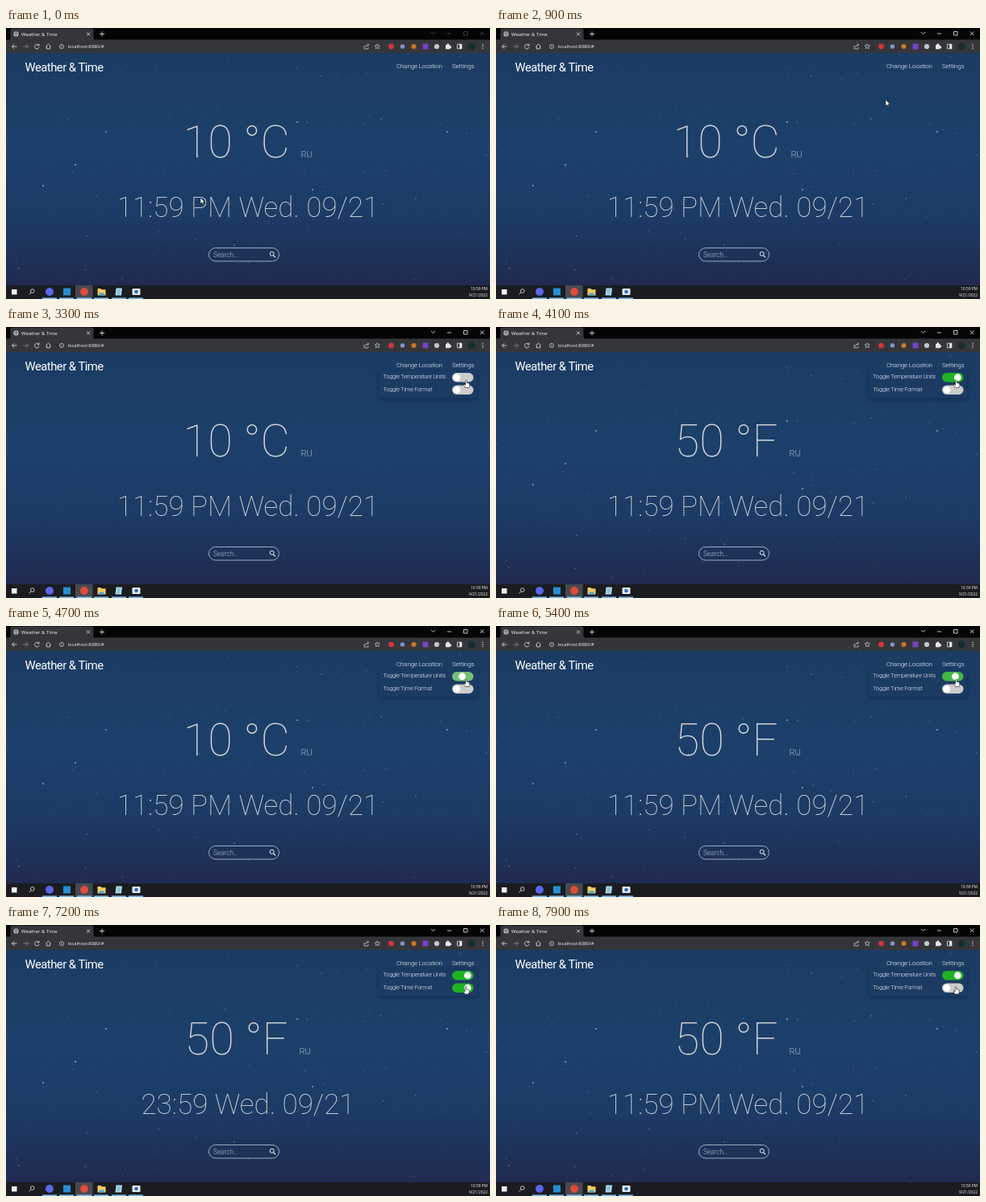
Recreate the animation shown at these times as an HTML page. Size 600 px wide and 337 px high, loop 8000 ms.

```html
<!DOCTYPE html>
<html lang="en">
<head>
<meta charset="utf-8">
<title>Weather &amp; Time</title>
<style>
html, body { margin: 0; width: 100%; height: 100%; overflow: hidden; background: #000; }
svg { display: block; width: 100vw; height: 100vh; font-family: Roboto, sans-serif; }
.thin { font-weight: 100; fill: #d3d6da; }
.light { font-weight: 300; fill: #f4f6f9; }
.line { fill: none; stroke: #d5d7da; stroke-width: .9; }
.ui { font-family: "Open Sans", "Noto Sans", sans-serif; fill: #f7f7f8; }
</style>
</head>
<body>
<svg viewBox="0 0 600 337" preserveAspectRatio="none">
  <defs>
    <linearGradient id="sky" x2="0" y2="1">
      <stop offset="0" stop-color="#1b3b62"/>
      <stop offset=".4" stop-color="#1c406a"/>
      <stop offset=".7" stop-color="#1c3b65"/>
      <stop offset="1" stop-color="#202a50"/>
    </linearGradient>
    <filter id="shadow" x="-20%" y="-30%" width="140%" height="180%">
      <feDropShadow dx="0" dy="2" stdDeviation="2" flood-color="#0b1c3a" flood-opacity=".4"/>
    </filter>
  </defs>

  <rect y="31" width="600" height="290" fill="url(#sky)"/>
  <g id="stars" fill="#d7e5f2"></g>

  <g id="browser">
    <rect width="600" height="15" fill="#050506"/>
    <rect y="14.5" width="600" height="16.5" fill="#35363a"/>
    <path d="M3 15Q5.500 15 5.500 12V3Q5.500 .5 8 .5H106Q108.500 .5 108.500 3V12Q108.500 15 111 15Z" fill="#35363a"/>
    <circle cx="12.500" cy="7.500" r="3.200" fill="#aeb1b5"/>
    <path class="line" d="M9.500 7h6M12.500 4.500v6" style="stroke:#55575b;stroke-width:.7"/>
    <text class="ui" x="19" y="9.700" font-size="5.950">Weather &amp; Time</text>
    <path class="line" d="M100 5.500l4 4m0-4l-4 4M116 7.500h6m-3-3v6"/>
    <path id="windowButtons" class="line" d="M527 5l2.500 2.500L532 5M547 7h5M567.500 4.500h4.500V9h-4.500ZM588 4.500l4.500 4.500m0-4.500L588 9"/>
    <path class="line" d="M13.500 23H7.500m2.800-2.800L7.500 23l2.800 2.800"/>
    <path class="line" d="M21.500 23h6m-2.800-2.800L27.500 23l-2.800 2.800" style="stroke:#85878b"/>
    <path class="line" d="M40.600 21.500A2.800 2.800 0 1 0 41 24M41 19.700v2.200h-2.200M49.500 22.800l3-2.700 3 2.700M50.300 22.500v3.300h4.400v-3.300"/>
    <rect x="61.500" y="17.500" width="407" height="11" rx="5.500" fill="#343538"/>
    <circle class="line" cx="69" cy="23" r="2.600" style="stroke-width:.7"/>
    <path class="line" d="M69 22.500v1.800M69 21.300v.6" style="stroke-width:.7"/>
    <text class="ui" x="76.500" y="25.200" font-size="5.800">localhost:8080/#</text>
    <path class="line" d="M444 22v4h5v-2M445.500 24q0-3 4-3m-1.500-1.700l1.700 1.700-1.700 1.700" style="stroke-width:.7"/>
    <path class="line" d="M460.300 19.800l.9 2 2.200.2-1.700 1.500.5 2.200-1.900-1.100-1.900 1.100.5-2.200-1.700-1.500 2.200-.2Z" style="stroke-width:.7"/>
    <circle cx="477.500" cy="23" r="3.300" fill="#d9343c"/>
    <circle cx="491.500" cy="23" r="2.700" fill="#8095c9"/>
    <circle cx="505.500" cy="23" r="3" fill="#c77a25"/>
    <rect x="516.500" y="19.500" width="7" height="7" fill="#7543c5"/>
    <circle cx="534" cy="23" r="3.100" fill="#c5c7ca"/>
    <path d="M545 21h1.600a1.300 1.300 0 1 1 2.400 0h1.500v1.800a1.200 1.200 0 1 1 0 2.200V26.300H545Z" fill="#e4e5e6"/>
    <path class="line" d="M559.500 20.200h5.400v5.600h-5.400Z"/>
    <path d="M562.200 20.200h2.700v5.600h-2.700Z" fill="#eee"/>
    <circle cx="577" cy="23" r="4.500" fill="#172c31"/>
    <g fill="#dcdde0"><circle cx="591" cy="20.500" r=".7"/><circle cx="591" cy="23" r=".7"/><circle cx="591" cy="25.500" r=".7"/></g>
  </g>

  <g id="page">
    <text class="light" x="23.500" y="53.600" font-size="14.800" letter-spacing="-.5" style="fill:#fff;font-weight:400">Weather &amp; Time</text>
    <g class="light" font-size="8.100" letter-spacing="-.2">
      <text x="484" y="50.200">Change Location</text>
      <text x="553" y="50.200">Settings</text>
    </g>
    <text id="degrees" class="thin" y="160.700" font-size="56"></text>
    <text id="country" class="light" y="161" font-size="11.200" style="fill:#9fb0c4">RU</text>
    <text id="clock" class="thin" x="300" y="234.900" font-size="35" text-anchor="middle"></text>
    <rect x="251.500" y="273.500" width="87" height="16.500" rx="8.250" fill="none" stroke="#a9bacb" stroke-width=".9"/>
    <text class="light" x="257" y="284.600" font-size="8.200" style="fill:#b4c0cf">Search...</text>
    <path d="M331.500 282.800l2.600 2.600" stroke="#edf2f5" stroke-width="1.200"/>
    <circle cx="329.700" cy="280.800" r="2.500" fill="none" stroke="#edf2f5"/>
  </g>

  <g id="menu">
    <rect x="462.500" y="54.500" width="121.500" height="33.500" fill="#1b3b64" filter="url(#shadow)"/>
    <g class="light" font-size="7.200" letter-spacing="-.15">
      <text x="467.500" y="64.200">Toggle Temperature Units</text>
      <text x="467.500" y="79.500">Toggle Time Format</text>
    </g>
    <g id="unitSwitch" transform="translate(553 57)"><rect width="26.500" height="11.500" rx="5.750"/><circle cy="5.750" r="4.400" fill="#fff"/></g>
    <g id="formatSwitch" transform="translate(553 72.500)"><rect width="26.500" height="11.500" rx="5.750"/><circle cy="5.750" r="4.400" fill="#fff"/></g>
  </g>
  <path id="underline" d="M550 54.500h33.500" stroke="#d5dde6" stroke-width=".8"/>

  <g id="taskbar">
    <rect y="320" width="600" height="17" fill="#1b1c20"/>
    <rect x="86" y="320" width="21.500" height="17" fill="#484a4f"/>
    <rect x="7" y="325" width="6.500" height="6.500" fill="#f1f1f1"/>
    <circle class="line" cx="32.800" cy="327" r="2.300"/><path class="line" d="M31.200 328.700l-2.500 2.700"/>
    <circle cx="54" cy="328" r="5" fill="#5967e8"/>
    <rect x="71" y="323.500" width="9" height="9" fill="#258ed2"/>
    <circle cx="97" cy="328" r="4.900" fill="#df4c3c"/>
    <path d="M113.500 324h4l1 1.200h5v7.300h-10Z" fill="#f4cc62"/><path d="M115.500 329.500h6v3h-6Z" fill="#4ba5db"/>
    <path d="M136.500 323.500h7.500l-1 9h-7.500Z" fill="#a8d9eb"/><path d="M138 326h4m-4.300 2h4m-4.200 2h4" stroke="#538da7" stroke-width=".6"/>
    <rect x="156.500" y="324" width="10" height="8" rx="1" fill="#e2ebf6"/><circle cx="161.500" cy="328" r="2.300" fill="#316bb4"/>
    <g id="running" fill="#76b9ed"></g>
    <g class="ui" font-size="4.850" text-anchor="end"><text x="597" y="326">10:59 PM</text><text x="597" y="334.200">9/21/2022</text></g>
  </g>

  <g id="cursor" stroke="#111" stroke-width=".6" stroke-linejoin="round" fill="#fff">
    <path id="arrow" d="M0 0V7.500L1.800 5.900 3 8.500 4.200 8 3.100 5.400H5.500Z"/>
    <path id="hand" d="M-.9 .7Q0-.5 .9 .7V3.500L2 3.600 3.200 4 4.300 4.500V7.200L3.400 9.500H-1L-3 6.300Q-3.100 5-1.900 5.400L-.9 6.300Z"/>
  </g>
</svg>
<script>
const LOOP = 8000, SLIDE = 400;
const SVG = "http://www.w3.org/2000/svg";
const el = id => document.getElementById(id);
const clamp = v => Math.max(0, Math.min(1, v));
const ease = v => { v = clamp(v); return v * v * (3 - 2 * v); };
const mix = (a, b, p) => a + (b - a) * p;
const show = (id, on) => el(id).setAttribute("visibility", on ? "visible" : "hidden");

const unitClicks = [3700, 4500, 5120];
const formatClicks = [6400, 7250];
// time, x, y of the pointer tip
const pointerPath = [
  [0, 241, 211], [300, 241, 211], [1200, 567, 47], [1500, 567, 48],
  [1850, 563, 61.5], [2400, 563, 61.5], [2900, 570.5, 66], [5500, 570.5, 66],
  [6100, 570, 76.5], [8000, 570, 76.5]
];

function add(parent, tag, attrs) {
  const node = document.createElementNS(SVG, tag);
  for (const key in attrs) node.setAttribute(key, attrs[key]);
  el(parent).append(node);
}

function buildStars() {
  let seed = 41;
  const random = () => (seed = seed * 16807 % 2147483647) / 2147483647;
  const bright = [[124, 129], [86, 170], [46, 196], [361, 117], [380, 201], [547, 129],
    [16, 299], [100, 259], [283, 270], [465, 113], [508, 212], [391, 60]];
  bright.forEach(([cx, cy], i) => add("stars", "circle", { cx, cy, r: i < 6 ? .85 : .65, opacity: i < 6 ? .9 : .6 }));
  for (let i = 0; i < 340; i++) {
    add("stars", "circle", {
      cx: random() * 600, cy: 32 + random() * 287,
      r: .35 + random() * .25, opacity: .15 + random() ** 3 * .5
    });
  }
}

function pointerAt(t) {
  const i = Math.max(1, pointerPath.findIndex(p => p[0] > t));
  const [t0, x0, y0] = pointerPath[i - 1], [t1, x1, y1] = pointerPath[i];
  const p = ease((t - t0) / (t1 - t0));
  return [mix(x0, x1, p), mix(y0, y1, p)];
}

function switchState(clicks, t) {
  const past = clicks.filter(c => c <= t);
  const on = past.length % 2 === 1;
  const p = past.length ? ease((t - past[past.length - 1]) / SLIDE) : 1;
  return { on, level: on ? p : 1 - p };
}

function drawSwitch(id, level) {
  const [track, knob] = el(id).children;
  const rgb = [mix(204, 30, level), mix(204, 178, level), mix(204, 36, level)].map(Math.round);
  track.setAttribute("fill", `rgb(${rgb})`);
  knob.setAttribute("cx", mix(5.9, 19.3, level));
}

function draw(t) {
  const unit = switchState(unitClicks, t), format = switchState(formatClicks, t);
  drawSwitch("unitSwitch", unit.level);
  drawSwitch("formatSwitch", format.level);

  el("degrees").textContent = unit.on ? "50 °F" : "10 °C";
  el("degrees").setAttribute("x", unit.on ? 221.5 : 219.5);
  el("country").setAttribute("x", unit.on ? 363.5 : 365.5);
  el("clock").textContent = (format.on ? "23:59" : "11:59 PM") + " Wed. 09/21";

  show("menu", t >= 1200);
  show("underline", t >= 1100 && t < 2150);
  el("underline").setAttribute("opacity", ease((t - 1100) / 200) * (1 - ease((t - 1900) / 250)));
  el("stars").setAttribute("opacity", 1 - .92 * Math.exp(-(((t - 3300) / 220) ** 2)));
  el("windowButtons").setAttribute("opacity", t < 500 ? .3 : 1);

  const [x, y] = pointerAt(t);
  el("cursor").setAttribute("transform", `translate(${x} ${y})`);
  show("arrow", t < 1100);
  show("hand", t >= 1100);
}

buildStars();
[54, 75, 97, 118, 140, 161].forEach(x => add("running", "rect", { x: x - 9, y: 335.4, width: 18, height: 1.6 }));

const start = performance.now();
function tick() {
  draw((performance.now() - start) % LOOP);
  requestAnimationFrame(tick);
}
tick();
</script>
</body>
</html>
```
